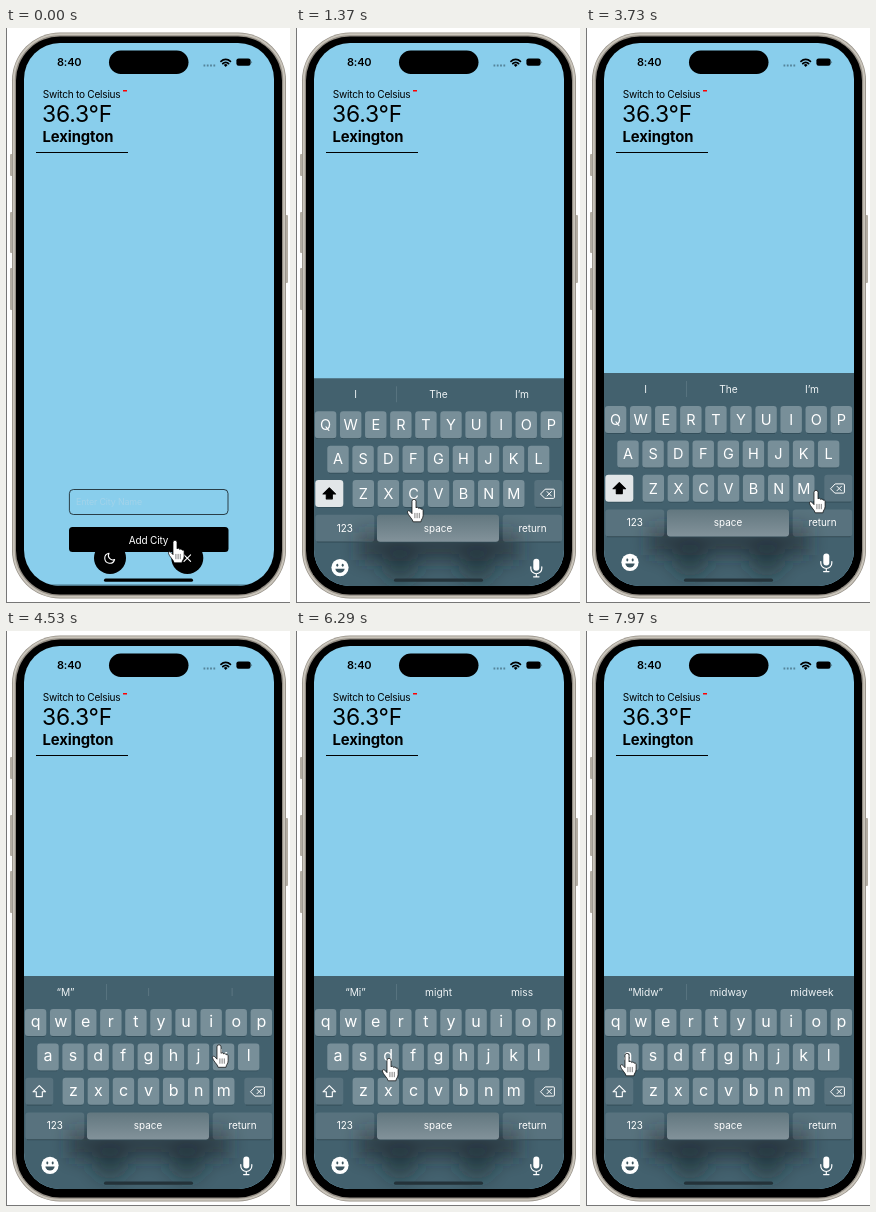
These frames come from a looping animation (284x575 px, 8 s). An HTML page:

```html
<!DOCTYPE html>
<html lang="en">
<head>
<meta charset="utf-8">
<title>Weather app</title>
<style>
  html, body { margin: 0; width: 100%; height: 100%; overflow: hidden; background: #fff; }
  svg { display: block; width: 284px; height: 575px; }
  text { font-family: Inter, Roboto, sans-serif; }
  .mid { text-anchor: middle; }
  .light { fill: #fff; }
  .line { stroke-linecap: round; stroke-linejoin: round; }
</style>
</head>
<body>
<svg viewBox="0 0 284 575">
  <defs>
    <linearGradient id="spaceFill" x2="0" y2="1">
      <stop offset="0" stop-color="#62777f"/>
      <stop offset="1" stop-color="#82929a"/>
    </linearGradient>
    <clipPath id="screen"><rect x="18" y="15" width="250" height="543" rx="36"/></clipPath>
    <filter id="soft" x="-30%" y="-80%" width="160%" height="260%"><feGaussianBlur stdDeviation="9"/></filter>
  </defs>

  <!-- phone -->
  <path d="M.5 0V575M0 574.5H284" stroke="#777" fill="none"/>
  <g fill="#b3ada3">
    <rect x="4" y="126" width="4" height="22" rx="1"/>
    <rect x="4" y="184" width="4" height="41" rx="1"/>
    <rect x="4" y="240" width="4" height="42" rx="1"/>
    <rect x="278" y="187" width="4" height="68" rx="1"/>
  </g>
  <rect x="6" y="4.5" width="274" height="566" rx="48" fill="#938d84"/>
  <rect x="7.8" y="6.3" width="270.4" height="562.4" rx="46.2" fill="none" stroke="#c9c4ba" stroke-width="2"/>
  <rect x="10" y="8.5" width="266" height="558" rx="44"/>

  <g clip-path="url(#screen)">
    <rect x="18" y="15" width="250" height="543" fill="#89ceec"/>
    <rect x="18" y="556.5" width="250" height="1.5" fill="#4b7486"/>

    <!-- status bar -->
    <text x="51" y="38" font-size="11" font-weight="600" letter-spacing="-.2">8:40</text>
    <rect x="103" y="22.5" width="79.5" height="23.5" rx="11.75"/>
    <path d="M197.5 37.5h12" stroke="#55849a" stroke-width="1.8" stroke-dasharray="1.8 1.5"/>
    <path class="line" fill="none" d="M215 33.4a6.6 6.6 0 0 1 9.4 0M216.8 35.6a4 4 0 0 1 5.8 0" stroke="#000" stroke-width="1.8"/>
    <path d="M219.7 38.9l-1.9-2a2.6 2.6 0 0 1 3.8 0z"/>
    <rect x="230.4" y="30.4" width="14.2" height="7.4" rx="2.2"/>
    <path d="M245.4 32.7q1.6 1.4 0 2.8z" fill="#3c5a68"/>

    <!-- weather card -->
    <text x="36.8" y="69.5" font-size="10.1" letter-spacing="-.25">Switch to Celsius</text>
    <path d="M117 62.8h4" stroke="#f00" stroke-width="1.5"/>
    <text x="36" y="94" font-size="22.9" letter-spacing="-.2">36.3°F</text>
    <text x="36.5" y="113.5" font-size="14.8" font-weight="700" letter-spacing="-.08">Lexington</text>
    <path d="M30 124.5h92" stroke="#000"/>

    <!-- form -->
    <rect x="63.4" y="461.5" width="158.6" height="25" rx="4" fill="none" stroke="#000" stroke-width=".7"/>
    <text x="70" y="477.3" font-size="8.9" letter-spacing="-.15" fill="#a2d3ea">Enter City Name</text>
    <circle cx="104" cy="530" r="16"/>
    <circle cx="181.3" cy="530" r="16"/>
    <rect x="63" y="499" width="159.5" height="25" rx="3.5"/>
    <text class="mid light" x="142.5" y="515.5" font-size="10" letter-spacing="-.15">Add City</text>
    <path class="line" fill="none" d="M103 525.3a5 5 0 1 0 5.6 6.2a4.4 4.4 0 0 1-5.6-6.2zM178 526.8l6.6 6.6m0-6.6l-6.6 6.6" stroke="#fff" stroke-width="1.1"/>

    <g id="keyboard">
      <rect x="18" y="345" width="250" height="230" fill="#43616e"/>
      <g filter="url(#soft)" fill="#1d292f">
        <rect x="63" y="499" width="160" height="28" opacity=".6"/>
        <circle cx="104" cy="530" r="18" opacity=".5"/>
        <circle cx="181" cy="530" r="18" opacity=".5"/>
      </g>
      <path id="divider" d="M100.5 353v16" stroke="#5d7884" stroke-width=".8"/>
      <rect id="pick" x="101" y="348" width="83" height="25" rx="3" fill="#74797b"/>
      <g id="hints" class="mid" font-size="10.2" fill="#edf2f4"></g>
      <g id="keys"></g>
      <path id="shift" class="line" d="M33.3 454.6l6.3 6.2h-3.3v4.8h-6v-4.8h-3.3z" stroke-width="1.1"/>
      <path class="line" fill="none" stroke="#fff" d="M244.8 460.5l4.4-4.6h8.2q1 0 1 1v7.2q0 1-1 1h-8.2zM251 458.3l4.4 4.4m0-4.4l-4.4 4.4"/>
      <circle cx="44" cy="534.3" r="8.6" class="light"/>
      <g fill="#3c555f">
        <ellipse cx="41.3" cy="532" rx="1" ry="1.4"/>
        <ellipse cx="46.7" cy="532" rx="1" ry="1.4"/>
        <path d="M39.4 535.4h9.2a4.6 4 0 0 1-9.2 0z"/>
      </g>
      <rect x="237.3" y="525.5" width="6" height="12" rx="3" class="light"/>
      <path class="line" fill="none" d="M234.8 533.5v1.5a5.5 5.5 0 0 0 11 0v-1.5M240.3 540.5v3M237.6 543.6h5.4" stroke="#fff" stroke-width="1.2"/>
      <g id="popup">
        <path d="M-18.5-49q0-5 5-5h27q5 0 5 5v26q0 4-3.5 7t-4.2 7v20q0 3-3 3h-15.6q-3 0-3-3v-20q0-4-4.2-7t-3.5-7z" fill="#748c96"/>
        <text class="mid light" y="-28" font-size="22"></text>
      </g>
    </g>
    <rect id="homeBar" x="98" y="550.6" width="89" height="3.2" rx="1.6"/>
  </g>

  <g id="hand">
    <path class="light line" stroke="#000" stroke-width=".7" d="M-2 14.3V2.3a2 2 0 0 1 4 0V8.9a1.5 1.5 0 0 1 2.7.6a1.5 1.5 0 0 1 2.5.8a1.2 1.2 0 0 1 1.9 1V16.3c0 3-2 4-2.2 6.5H-.8C-1.5 19.8-6 16.3-6.6 13.1c-.2-1.5 1.6-1.9 2.6-.7z"/>
    <path class="line" stroke="#000" stroke-width=".5" d="M.9 14.3v4.5M3.1 14.3v4.5M5.3 14.3v4.5"/>
  </g>
</svg>

<script>
const LOOP = 8000;
const $ = id => document.getElementById(id);

function add(parent, tag, attrs, label = "") {
  const el = document.createElementNS("http://www.w3.org/2000/svg", tag);
  for (const name in attrs) el.setAttribute(name, attrs[name]);
  el.textContent = label;
  return parent.appendChild(el);
}

// Keys
const PITCH = 25.08;
const LETTER = "#788f99", SPECIAL = "rgba(255,255,255,.11)";
const letters = {};

function addKey(x, y, width, fill) {
  add($("keys"), "rect", { x: x + 1.5, y: y + 26.6, width: width - 3, height: 1.2, rx: 0.6, fill: "#314a55" });
  return add($("keys"), "rect", { x, y, width, height: 27, rx: 3.2, fill });
}

[["qwertyuiop", 29.6], ["asdfghjkl", 42], ["zxcvbnm", 67.3]].forEach(([row, first], r) => {
  const y = 378 + r * 34.4;
  [...row].forEach((char, i) => {
    const x = first + i * PITCH;
    addKey(x - 10.7, y, 21.4, LETTER);
    letters[char] = { x, y: y + 13.5, el: add($("keys"), "text", { x, class: "mid light" }) };
  });
});
const shiftKey = addKey(19.3, 446.8, 28, SPECIAL);
addKey(238.3, 446.8, 28, SPECIAL);
[["123", 19.3, 59, SPECIAL], ["space", 81, 122, "url(#spaceFill)"], ["return", 206.7, 59.5, SPECIAL]]
  .forEach(([label, x, width, fill]) => {
    addKey(x, 481.4, width, fill);
    add($("keys"), "text", { x: x + width / 2, y: 498.3, class: "mid light", "font-size": 9.9 }, label);
  });

const hints = [59.5, 142.5, 226].map(x => add($("hints"), "text", { x, y: 364.8 }));

function setCase(upper) {
  for (const char in letters) {
    const { x, y, el } = letters[char];
    el.textContent = upper ? char.toUpperCase() : char;
    el.setAttribute("font-size", upper ? 14.5 : 16);
    el.setAttribute("y", y + (upper ? 5.3 : 4.4));
  }
  shiftKey.setAttribute("fill", upper ? "#e2e6e8" : SPECIAL);
  $("shift").setAttribute("fill", upper ? "#000" : "none");
  $("shift").setAttribute("stroke", upper ? "#000" : "#fff");
}

// Pointer moves: start, ms per step, fingertip places
const moves = [
  [0, 150, [169, 512]],
  [150, 135, [146, 492], [124, 475], [118, 471]],
  [2940, 150, [131, 472], [152, 470], [178, 466], [204, 463], [224, 461], [230, 462], [222, 462]],
  [4260, 133, [219, 461], [217, 440], [213, 413.5], [212, 404], [211, 399], [211, 397], [211, 395], [210.5, 394]],
  [5330, 135, [208, 391]],
  [5600, 138, [188, 391], [150, 405], [118, 418], [102, 425], [96, 427], [93, 427]],
  [6570, 140, [92, 426], [84, 415], [72, 402], [62, 392], [56, 387], [55, 386], [55, 385.5], [55, 385]],
  [7710, 129, [52, 392], [44, 415], [41, 422]]
];

const hintSteps = [
  [0, "I", "The", "I’m"],
  [4390, "“M”", "I", "I"],
  [4660, "“M”", "my", "me"],
  [5730, "“Mi”", "might", "miss"],
  [6705, "“Mid”", "mid", "middle"],
  [7835, "“Midw”", "midway", "midweek"]
];

const presses = [[4260, "M"], [5600, "i"], [6570, "d"], [7710, "w"]];
const PRESS = 128;

const current = (steps, t) => steps.filter(step => step[0] <= t).pop();
const show = (el, on) => el.setAttribute("visibility", on ? "visible" : "hidden");
const place = (el, x, y) => el.setAttribute("transform", `translate(${x} ${y})`);

function keyboardDrop(t) {
  if (t < 1130) return 230;
  if (t >= 1630) return 0;
  const sampled = current([[1130], [1260], [1370], [1500]], t)[0];
  const k = (sampled - 1110) * 0.0215;
  return 214 * (1 + k) * Math.exp(-k);
}

function draw(t) {
  const [start, step, ...places] = current(moves, t);
  const at = Math.min(places.length - 1, Math.floor((t - start) / step));
  place($("hand"), ...places[at]);

  const drop = keyboardDrop(t);
  place($("keyboard"), 0, drop);
  $("homeBar").setAttribute("fill", drop < 200 ? "#24333a" : "#000");
  setCase(t < 4390);

  const [since, ...words] = current(hintSteps, t);
  words.forEach((word, i) => {
    hints[i].textContent = word;
    hints[i].setAttribute("opacity", since === 4390 && i ? 0.15 : 1);
  });
  const picked = since === 6705;
  show($("pick"), picked);
  show($("divider"), !picked);

  const press = presses.find(([from]) => t >= from && t < from + PRESS);
  show($("popup"), press);
  if (press) {
    const { x, y } = letters[press[1].toLowerCase()];
    place($("popup"), x, y);
    $("popup").lastElementChild.textContent = press[1];
  }
}

const began = performance.now();
function tick() {
  draw((performance.now() - began) % LOOP);
  requestAnimationFrame(tick);
}
tick();
</script>
</body>
</html>
```
